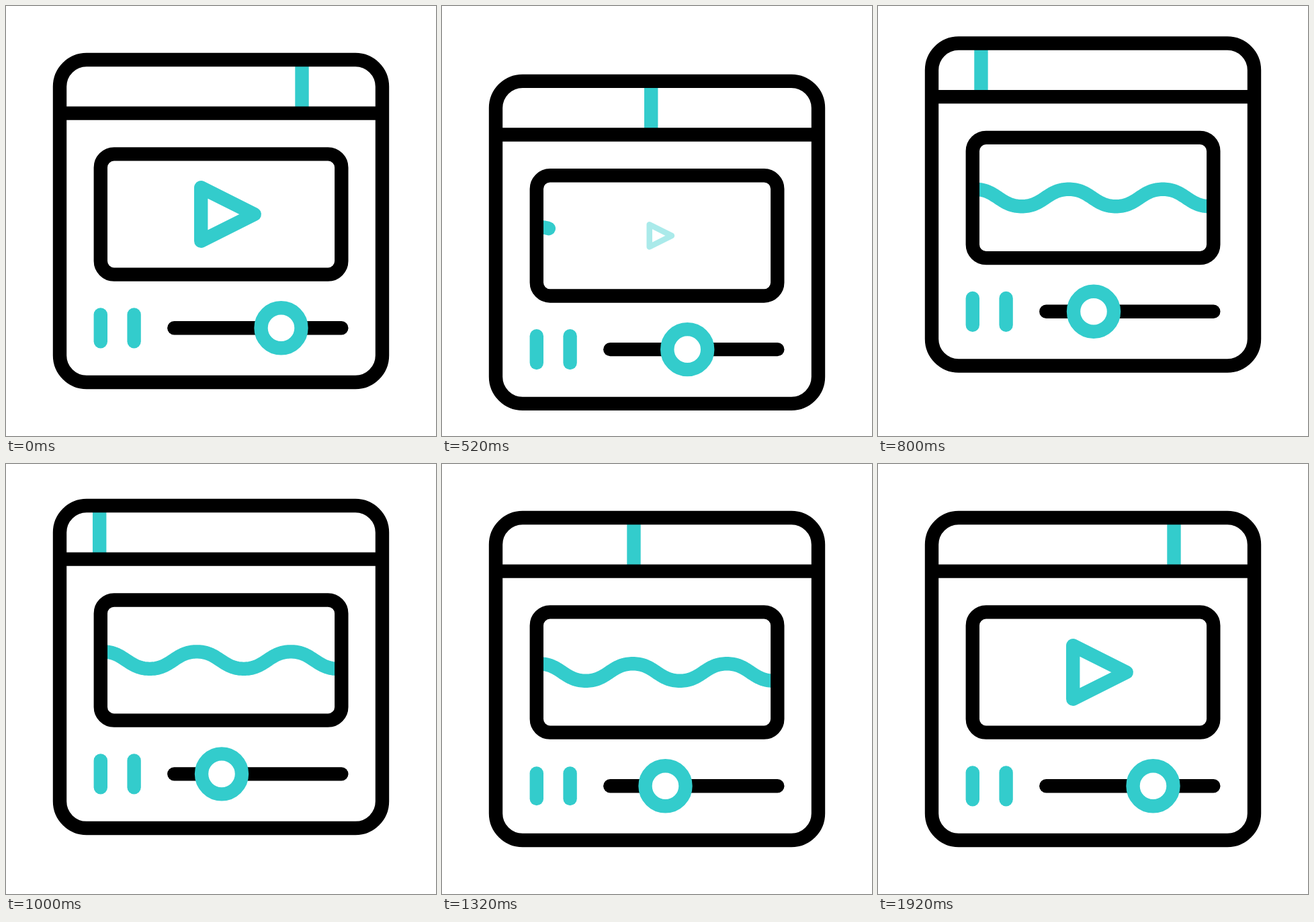
An HTML page with a canvas that plays this animation: 640x640 px, repeating every 2 s.

```html
<!DOCTYPE html>
<html lang="en">
<head>
<meta charset="utf-8">
<title>Video player</title>
<style>
html, body { margin: 0; width: 100%; height: 100%; overflow: hidden; background: #fff; }
canvas { display: block; width: 100vw; height: 100vh; }
</style>
</head>
<body>
<canvas id="stage" width="640" height="640"></canvas>
<script>
const ctx = document.getElementById("stage").getContext("2d");
const LOOP = 2000, STEP = 40;
const TEAL = "#33cccc", BLACK = "#000", WHITE = "#fff";
const WEIGHT = 20.4;

// Smooth 0..1 ramp between two times
function ease(t, from, to) {
  const x = Math.min(1, Math.max(0, (t - from) / (to - from)));
  return x * x * (3 - 2 * x);
}

// Eased value through [time, value] keys
function track(t, keys) {
  let v = keys[0][1];
  for (let i = 1; i < keys.length; i++) {
    v += (keys[i][1] - keys[i - 1][1]) * ease(t, keys[i - 1][0], keys[i][0]);
  }
  return v;
}

function stroke(color) {
  ctx.strokeStyle = color;
  ctx.stroke();
}

function line(x1, y1, x2, y2, color, cap = "round") {
  ctx.lineCap = cap;
  ctx.beginPath();
  ctx.moveTo(x1, y1);
  ctx.lineTo(x2, y2);
  stroke(color);
}

function box(x1, y1, x2, y2, r) {
  ctx.beginPath();
  ctx.roundRect(x1, y1, x2 - x1, y2 - y1, r);
  stroke(BLACK);
}

function waveY(x) {
  const a = (x - 144) / 70 * Math.PI;
  return 310 - 12.75 * (Math.cos(a) - 0.04 * Math.cos(3 * a)) / 0.96;
}

function wave(x1, x2) {
  if (x2 - x1 < 0.5) return;
  ctx.save();
  ctx.beginPath();
  ctx.rect(141, 220, 358, 180);
  ctx.clip();
  ctx.lineCap = "round";
  ctx.beginPath();
  ctx.moveTo(x1, waveY(x1));
  for (let x = x1 + 2; x < x2; x += 2) ctx.lineTo(x, waveY(x));
  ctx.lineTo(x2, waveY(x2));
  stroke(TEAL);
  ctx.restore();
}

function playIcon(scale, alpha) {
  if (scale <= 0 || alpha <= 0) return;
  ctx.save();
  ctx.globalAlpha = alpha;
  ctx.translate(322, 310);
  ctx.scale(scale, scale);
  ctx.beginPath();
  ctx.moveTo(-31.8, -39.8);
  ctx.lineTo(-31.8, 39.8);
  ctx.lineTo(47.8, 0);
  ctx.closePath();
  stroke(TEAL);
  ctx.restore();
}

function draw(t) {
  ctx.fillStyle = WHITE;
  ctx.fillRect(0, 0, 640, 640);
  ctx.lineWidth = WEIGHT;
  ctx.lineJoin = "round";

  ctx.save();
  ctx.translate(0, track(t, [[175, 0], [510, 32], [850, -28], [1220, 0]]));

  const tick = track(t, [[200, 440.5], [920, 130.5], [1720, 440.5]]);
  line(tick, 82, tick, 158, TEAL, "butt");

  const out = 1 - ease(t, 320, 680);
  const back = ease(t, 1600, 1800);
  playIcon(t < 1200 ? out : 1, t < 1200 ? out : back);
  wave(track(t, [[1410, 140], [1775, 500]]), track(t, [[475, 140], [800, 500]]));

  box(80, 80, 560, 560, 40);
  line(80, 159.6, 560, 159.6, BLACK, "butt");
  box(140.8, 220.4, 499.3, 399.6, 20);

  const squeeze = track(t, [[1280, 0], [1480, 10], [1680, 0]]);
  for (const x of [140.8, 190.6]) {
    line(x, 459.4 + squeeze, x, 499.2 - squeeze, TEAL);
  }

  line(250.3, 479.3, 499.3, 479.3, BLACK);
  const knob = track(t, [[280, 409.5], [760, 321], [1215, 321], [1680, 409.5]]);
  ctx.beginPath();
  ctx.arc(knob, 479.3, 30, 0, Math.PI * 2);
  ctx.fill();
  stroke(TEAL);
  ctx.restore();
}

const start = performance.now();
function tickFrame() {
  const t = (performance.now() - start) % LOOP;
  draw(Math.floor(t / STEP) * STEP);
  requestAnimationFrame(tickFrame);
}
tickFrame();
</script>
</body>
</html>
```
